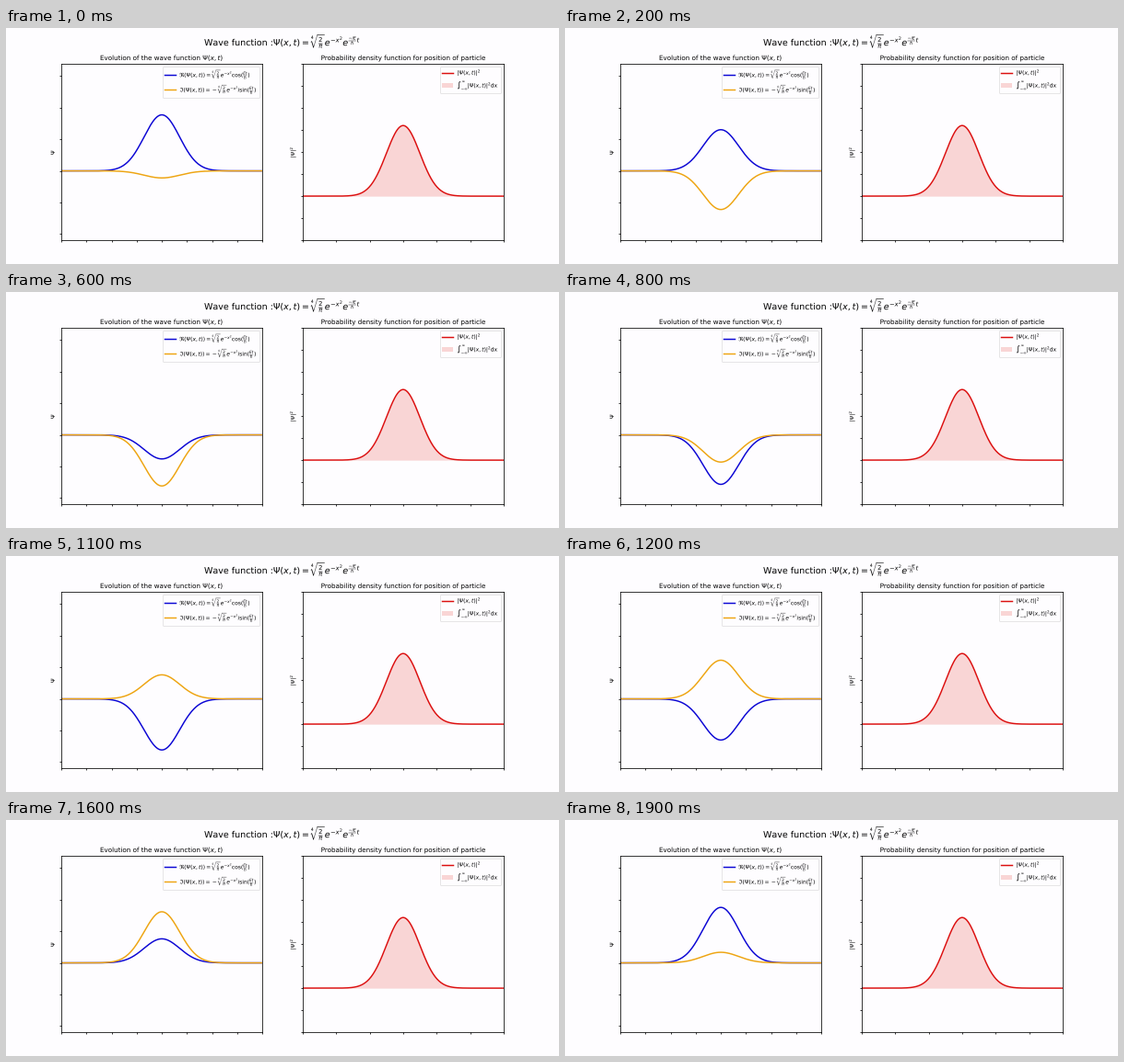
Write a matplotlib script that moves like this. It is 600 px wide and 257 px high and loops after 2 s.

```python
import numpy as np
import matplotlib.pyplot as plt
from matplotlib.animation import FuncAnimation
from matplotlib.patheffects import Normal
from matplotlib.text import Text

W, H = 600, 257
DPI = W / 14
FRAMES, INTERVAL = 20, 100
PHASE0 = 0.04 * np.pi

BACK = "#fefdff"
BLUE, ORANGE, RED, PINK = "#0c06d4", "#eea512", "#dc1010", "#f9d5d5"
ROOT = r"\sqrt[4]{\frac{2}{\pi}}e^{-x^2}"
ANGLE = r"(\frac{Et}{\hbar})"

plt.rcParams.update({
    "font.family": "DejaVu Sans", "font.size": 10, "text.hinting": "none",
    "mathtext.fontset": "dejavusans", "lines.linewidth": 2.5,
    "axes.linewidth": 1.3, "xtick.major.width": 1.3, "ytick.major.width": 1.3,
    "figure.facecolor": BACK, "axes.facecolor": BACK,
    "legend.loc": "upper right", "legend.borderpad": 0.3,
    "legend.labelspacing": 0.3,
})

# The tiny surplus keeps the pixel size from being rounded down.
fig, (left, right) = plt.subplots(
    1, 2, figsize=((W + 0.001) / DPI, (H + 0.001) / DPI), dpi=DPI)
fig.subplots_adjust(left=0.1, right=0.9, bottom=0.1, top=0.85, wspace=0.2)
fig.suptitle(r"Wave function :$\Psi(x,t) = " + ROOT
             + r"e^{\frac{-iE}{\hbar}t}$", fontsize=16, y=0.985)


def setup(ax, title, ylabel, xlim, ylim):
    ax.set(xlim=xlim, ylim=ylim)
    ax.set_title(title, fontsize=12)
    ax.set_ylabel(ylabel, labelpad=1.5)
    ax.xaxis.set_major_formatter("")
    ax.yaxis.set_major_formatter("")


setup(left, r"Evolution of the wave function $\Psi(x,t)$", r"$\Psi$",
      (-4, 4), (-1.1, 1.7))
setup(right, "Probability density function for position of particle",
      r"$|\Psi|^2$", (-3, 3), (-0.5, 1.5))

x = np.linspace(-4, 4, 400)
envelope = (2 / np.pi) ** 0.25 * np.exp(-x ** 2)

real, = left.plot(x, envelope, color=BLUE,
                  label=r"$\Re(\Psi(x,t))=" + ROOT + r"\cos" + ANGLE + "$")
imag, = left.plot(x, 0 * x, color=ORANGE,
                  label=r"$\Im(\Psi(x,t))=-" + ROOT + r"i\sin" + ANGLE + "$")
left.legend()

right.plot(x, envelope ** 2, color=RED, label=r"$|\Psi(x,t)|^2$")
right.fill_between(x, envelope ** 2, color=PINK, linewidth=0,
                   label=r"$\int_{-\infty}^{\infty}|\Psi(x,t)|^2$dx")
right.legend()

# Text drawn as outlines keeps its true spacing at this small size.
for text in fig.findobj(Text):
    text.set_path_effects([Normal()])


def update(frame):
    phase = PHASE0 + 2 * np.pi * frame / FRAMES
    real.set_ydata(envelope * np.cos(phase))
    imag.set_ydata(-envelope * np.sin(phase))
    return real, imag


anim = FuncAnimation(fig, update, frames=FRAMES, interval=INTERVAL,
                     init_func=lambda: update(0), repeat=True, repeat_delay=0)
plt.show()
```
